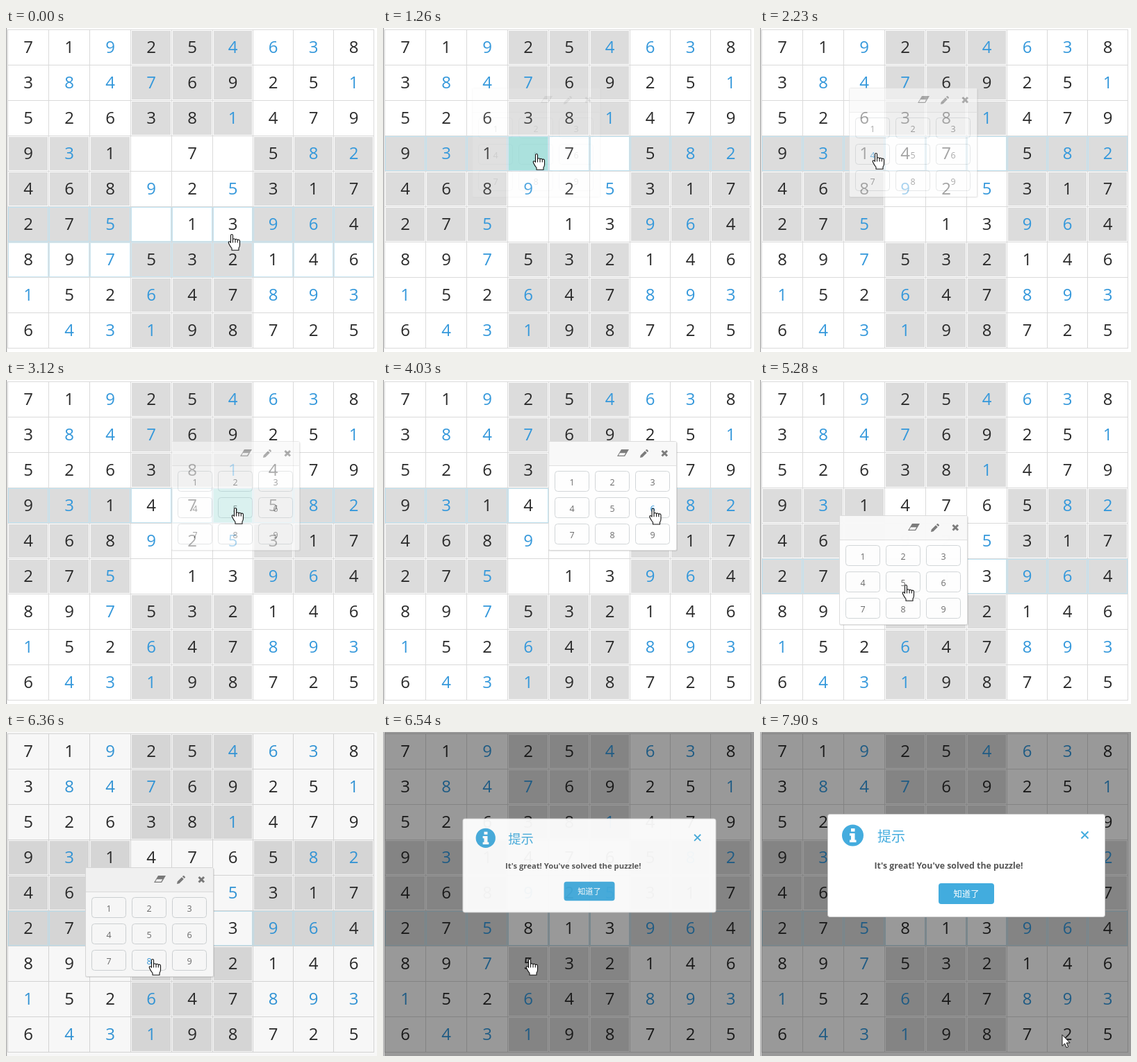
An HTML page that plays this animation: 534 by 467 pixels, repeating every 7990 ms.

```html
<!DOCTYPE html>
<html lang="en">
<head>
<meta charset="utf-8">
<title>Sudoku</title>
<style>
html, body { margin: 0; width: 100%; height: 100%; overflow: hidden; background: #fff; }
svg { display: block; width: 534px; height: 467px; }
text { font-family: "Open Sans", "Noto Sans", sans-serif; text-anchor: middle; }
.digit { font-size: 24px; }
.key { font-size: 12.5px; fill: #6c6c6c; }
.cjk { font-family: "Noto Sans CJK SC", "Noto Sans CJK", sans-serif; }
</style>
</head>
<body>
<svg id="stage" viewBox="0 0 534 467" xmlns="http://www.w3.org/2000/svg">
  <g id="board"></g>
  <g id="pads"></g>
  <rect id="shade" x="2" width="532" height="467" opacity="0"/>
  <g id="dialog" opacity="0">
    <rect x="97.5" y="118.5" width="399" height="148" rx="3" fill="#fff" stroke="#c8c8c8"/>
    <circle cx="133.5" cy="149" r="15.5" fill="#44acde"/>
    <path d="M131 139h5.5v4.600H131zM129 146h7.500v9.500h2v3.500H129v-3.500h2v-6h-2z" fill="#fff"/>
    <text class="cjk" x="189" y="157.500" font-size="20" fill="#44acde">提示</text>
    <path d="M462.500 143.500l10 10m0-10l-10 10" stroke="#44acde" stroke-width="2"/>
    <text x="271.500" y="197" font-size="12.350" font-weight="700" fill="#555">It's great! You've solved the puzzle!</text>
    <rect x="257" y="218" width="80" height="30" rx="4" fill="#42acde"/>
    <text class="cjk" x="297" y="237.500" font-size="12.300" fill="#fff">知道了</text>
  </g>
  <g id="mouse">
    <path id="hand" transform="translate(-1)" d="M-1.500 11V2q0-1.500 1.500-1.500T1.500 2v6q.3-1.200 1.700-1.200T5 8.300q.4-1 1.600-1t1.700 1.500q.4-.7 1.500-.7 1.700 0 1.700 2v5.400q0 3-1.500 4.700v3H0v-2.700q-2.500-3-4.300-6.800-1-2.200.2-2.800 1.200-.5 2.600 1.500zM1.500 8v4.500M5 8.500v4M8.300 9v3.500" fill="#fff" stroke="#111" stroke-width="1.100" stroke-linejoin="round"/>
    <path id="arrow" d="M.5.5v16l3.600-3.500 2.500 5.800 2.600-1.100-2.500-5.700h5z" fill="#fff" stroke="#111"/>
  </g>
</svg>
<script>
const LOOP = 7990, TRAVEL = 450, FADE = 400;
const $ = id => document.getElementById(id);
const NS = "http://www.w3.org/2000/svg";

function add(parent, tag, attrs, text) {
  const el = document.createElementNS(NS, tag);
  for (const k in attrs) el.setAttribute(k, attrs[k]);
  if (text !== undefined) el.textContent = text;
  return parent.appendChild(el);
}

// Board: a trailing * marks a blue digit
const colX = c => 2 + 59 * c - Math.max(0, c - 5);
const rowY = r => 2 + 51 * r;
const rows = [
  "719*254*6*3*8", "38*4*7*69251*", "526381*479",
  "93*147658*2*", "4689*25*317", "275*8139*6*4",
  "897*532146", "1*526*478*9*3*", "64*3*1*98725"
];
const board = $("board");
const digits = {}, teal = {}, glow = {};

add(board, "rect", { width: 534, height: 467, fill: "#fff" });
add(board, "rect", { width: 1, height: 467, fill: "#a4a4a4" });
add(board, "rect", { x: 1, width: 1, height: 467, fill: "#e6e6e6" });

let lines = "";
for (let i = 0; i < 10; i++)
  lines += `M2 ${rowY(i) + .5}H530M${colX(i) + .5} 2V462`;
add(board, "path", { d: lines, stroke: "#dadada", fill: "none" });

rows.forEach((row, r) => {
  const y = rowY(r), ring = add(board, "g", { opacity: 0, fill: "none", stroke: "#c0e4f3" });
  glow[r] = ring;
  row.match(/\d\*?/g).forEach((mark, c) => {
    const x = colX(c), w = colX(c + 1) - x, id = `${r}${c}`;
    const inner = { x: x + 2, y: y + 2, width: w - 3, height: 48 };
    const gray = (Math.floor(r / 3) + Math.floor(c / 3)) % 2;
    add(board, "rect", { ...inner, fill: gray ? "#dcdcdc" : "#fff" });
    teal[id] = add(board, "rect", { ...inner, fill: "#a0ddd9", opacity: 0 });
    add(ring, "rect", { x: x + 1.5, y: y + 1.5, width: w - 2, height: 49 });
    digits[id] = add(board, "text", {
      class: "digit", x: x + w / 2 + .5, y: y + 34, fill: mark[1] ? "#3498db" : "#2a2a2a"
    }, mark[0]);
  });
});

// Number pads
const keyX = i => 9 + 58 * (i % 3);
const keyY = i => 43 + 38 * Math.floor(i / 3);

function makePad([x, y]) {
  const g = add($("pads"), "g", { transform: `translate(${x} ${y})`, opacity: 0 });
  add(g, "rect", { y: 1, width: 186, height: 158, rx: 3, opacity: .1 });
  add(g, "rect", { x: .5, y: .5, width: 184, height: 157, rx: 2, fill: "#fefefe", stroke: "#dcdcdc" });
  add(g, "path", { d: "M1 1H184V35H1z", fill: "#f8f8f8" });
  add(g, "path", { d: "M1 35.5H184", stroke: "#e0e0e0" });
  add(g, "path", { transform: "translate(99 12)", fill: "#7c7c7c", "fill-rule": "evenodd",
    d: "M0 10L6 0H17L11 10zM1.900 8.800H10.200L12.200 5.300H4z" });
  add(g, "path", { transform: "translate(132 12)", fill: "#7c7c7c",
    d: "M0 12l.7-3.500L7 2.200 9.800 5 3.500 11.300zM7.900 1.300l1-1q.7-.6 1.400 0l1.400 1.400q.6.7 0 1.400l-1 1z" });
  add(g, "path", { d: "M163.500 14l7.500 7.500m0-7.500l-7.500 7.500", stroke: "#7c7c7c", "stroke-width": 3 });
  const keys = [];
  for (let i = 0; i < 9; i++) {
    add(g, "rect", { x: keyX(i) + .5, y: keyY(i) + .5, width: 49, height: 29, rx: 4, fill: "none", stroke: "#d2d6d8" });
    keys.push(add(g, "text", { class: "key", x: keyX(i) + 25, y: keyY(i) + 20.5 }, i + 1));
  }
  return { g, keys };
}

// Each step: go to a cell, open its pad, aim at a key, pick it
const steps = [
  { cell: "33", at: [222, 181], pad: [128, 86], key: 4, go: 80, open: 1170, aim: 1340, pick: 2050, close: FADE },
  { cell: "35", at: [331, 184], pad: [238, 88], key: 6, go: 2250, open: 2890, aim: 3300, pick: 4030, close: FADE },
  { cell: "53", at: [211, 295], pad: [114, 195], key: 8, go: 4020, open: 4900, aim: 5550, pick: 6370, close: 130 }
];
const moves = [];
for (const s of steps) {
  Object.assign(s, makePad(s.pad));
  const i = s.key - 1;
  moves.push({ to: s.at, start: s.go, len: TRAVEL });
  moves.push({ to: [s.pad[0] + keyX(i) + 31, s.pad[1] + keyY(i) + 13], start: s.aim, len: TRAVEL });
}
moves.push({ to: [434.5, 436], start: 7010, len: 720 });

const ramp = (t, start, len) => Math.min(1, Math.max(0, (t - start) / len));
const swing = p => .5 - Math.cos(p * Math.PI) / 2;
const show = (el, v) => el.setAttribute("opacity", v);

function mouseAt(t) {
  let [x, y] = [326, 297];
  for (const m of moves) {
    const p = ramp(t, m.start, m.len);
    x += (m.to[0] - x) * p;
    y += (m.to[1] - y) * p;
  }
  return [x, y];
}

function renderStep(s, t) {
  show(s.g, swing(ramp(t, s.open, FADE)) * (1 - swing(ramp(t, s.pick, s.close))));
  show(digits[s.cell], t < s.pick ? 0 : 1);
  show(teal[s.cell], t < s.pick ? ramp(t, s.go + TRAVEL - 100, 100) : 0);
  s.keys[s.key - 1].style.fill = t > s.aim + TRAVEL / 2 ? "#3498db" : "";
}

function render(t) {
  for (const s of steps) renderStep(s, t);

  show(glow[3], ramp(t, 250, 280) - ramp(t, 4200, 800));
  show(glow[5], 1 - ramp(t, 150, 350) + ramp(t, 4340, 300));
  show(glow[6], .8 - .8 * ramp(t, 0, 450));

  show($("shade"), .4 * swing(ramp(t, 6320, 220)));
  const p = ramp(t, 6400, 230);
  show($("dialog"), 1 - (1 - p) ** 3);
  $("dialog").setAttribute("transform",
    `translate(297 192.5) scale(${.775 + .225 * p}) translate(-297 -192.5)`);

  $("mouse").setAttribute("transform", `translate(${mouseAt(t)})`);
  show($("hand"), t < 6600 ? 1 : 0);
  show($("arrow"), t < 6600 ? 0 : 1);
}

const start = performance.now();
function tick() {
  render((performance.now() - start) % LOOP);
  requestAnimationFrame(tick);
}
tick();
</script>
</body>
</html>
```
